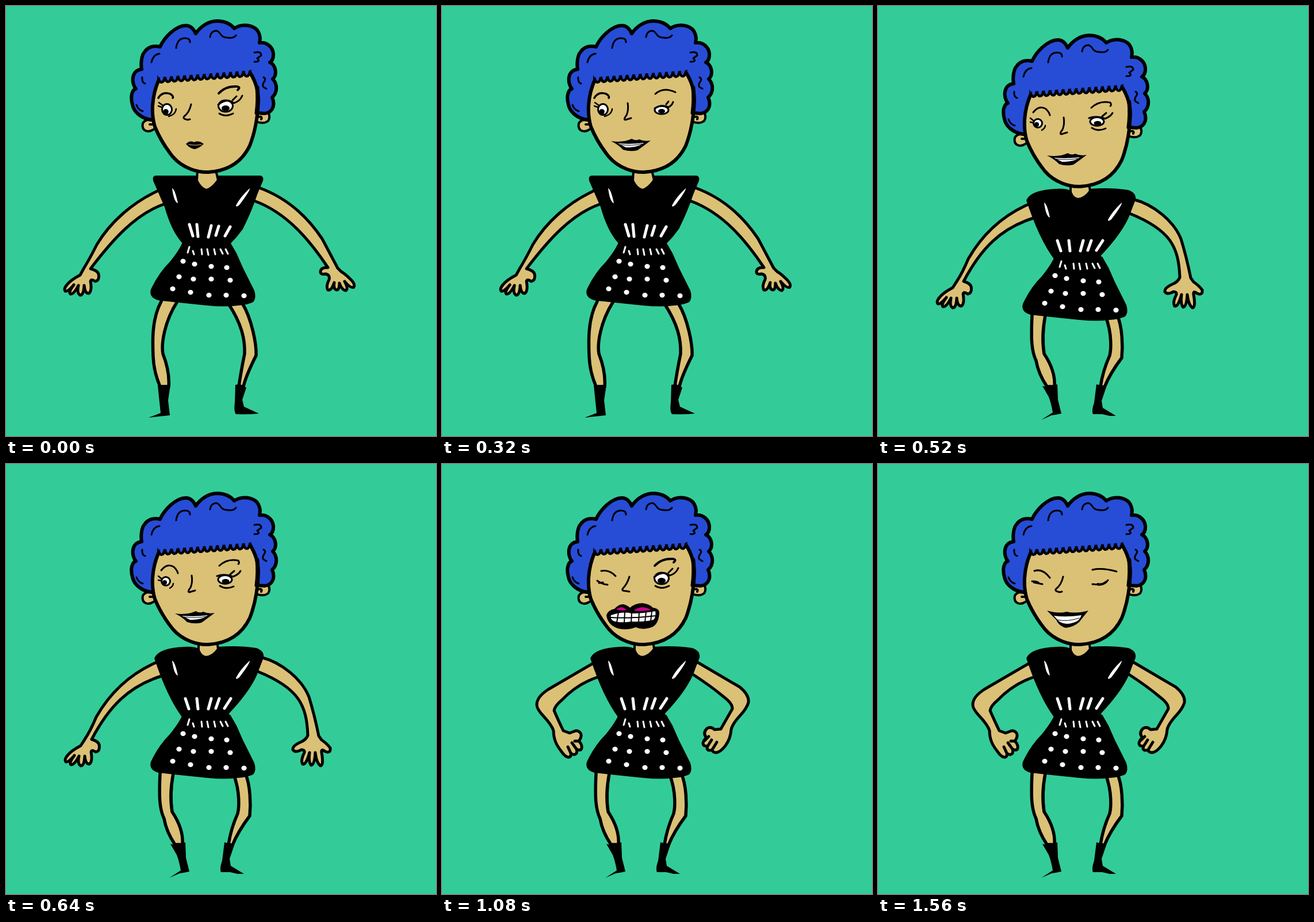
An HTML page that plays this animation: 748x748 px, repeating every 1.6 s.

```html
<!DOCTYPE html>
<html lang="en">
<head>
<meta charset="utf-8">
<title>Dancing woman</title>
<style>
html, body { margin: 0; height: 100%; overflow: hidden; background: #33cc99; }
svg { display: block; width: 100%; height: 100%; }
.limb, .line, .skin { stroke: #000; stroke-width: 6; stroke-linecap: round; stroke-linejoin: round; }
.limb, .skin { fill: #dbc176; }
.limb { stroke-width: 5.5; }
.arm { stroke-width: 5; }
.thin { stroke-width: 4; }
.line { fill: none; stroke-width: 3; }
.white { fill: #fff; }
.ring { fill: #fff; stroke: #000; stroke-width: 3; }
.hair { fill: #274dd7; }
.marks { fill: none; stroke: #fff; stroke-width: 5; stroke-linecap: round; }
</style>
</head>
<body>
<svg viewBox="0 0 748 748">
  <!-- Legs -->
  <g data-t="0-520">
    <path class="limb" d="M270 514C253 545 255 585 256 610Q257 636 268 662L283 662Q285 636 273 605C270 588 275 550 298 514"/>
    <path class="limb" d="M387 518C410 553 416 580 415 605Q408 640 405 662L413 662Q417 644 435 608C436 590 428 545 411 517"/>
    <path d="M264 660L286 659L282 686L285 712L248 716L269 708L266 680ZM399 659Q410 656 418 664L411 685L414 697L440 709Q420 711 400 710Q396 705 398 690Z"/>
  </g>
  <g data-t="520-1600">
    <path class="limb" d="M268 538C266 580 267 600 275 617Q279 640 294 662L307 662Q309 635 289 605C285 580 287 560 291 538"/>
    <path class="limb" d="M396 540C408 572 405 600 403 608Q391 635 387 662L394 663Q403 640 424 612C426 590 425 560 417 540"/>
    <path d="M286 661L296 663L312 658L313 685L319 709Q310 711 302 712L284 720L304 707Q301 690 297 680ZM380 658L397 663L389 687L391 699L414 713L403 713L390 710L374 710Q371 704 376 690Z"/>
  </g>

  <!-- Arms -->
  <g data-t="0-520">
    <path class="limb arm" d="M270 319C220 340 180 378 158 415Q146 439 135 457L129 468Q112 477 106 485Q100 492 103 496Q107 498 118 485Q108 498 112 501Q118 502 126 486Q123 500 129 503Q135 503 136 486Q137 500 144 500Q150 496 147 479Q148 474 155 479Q163 478 161 466Q159 460 147 457C185 407 225 362 274 345"/>
    <path class="limb arm" d="M432 339C490 360 530 410 560 455Q548 454 547 462Q547 468 556 466Q564 468 562 476Q556 488 560 494Q566 496 571 481Q569 492 575 494Q580 494 580 482Q584 494 591 495Q596 492 589 479Q600 492 605 489Q608 484 600 476Q590 466 583 462L577 456Q566 435 550 405C530 375 495 336 440 316"/>
  </g>
  <g data-t="520-680">
    <path class="limb arm" d="M264 344C215 365 180 400 157 440Q147 464 137 479L130 490Q113 499 107 507Q101 514 104 518Q108 520 119 507Q109 520 113 523Q119 524 127 508Q124 522 130 525Q136 525 137 508Q138 522 145 522Q151 518 148 501Q149 496 156 501Q164 500 162 488Q160 482 149 479C179 422 213 387 270 369"/>
    <path class="limb arm" d="M438 361C510 390 523 420 525 472Q522 480 512 484Q498 490 499 497Q503 503 514 497Q520 497 519 502Q512 516 516 522Q522 524 528 502Q526 520 531 524Q537 522 538 502Q540 520 547 525Q553 524 549 502Q548 494 555 500Q565 504 564 494Q558 486 549 480L544 473Q537 438 527 405C515 375 480 345 443 336"/>
  </g>
  <g data-t="680-1600">
    <path class="limb arm" d="M264 346L185 392Q165 405 165 418Q164 425 176 438Q191 454 194 464C194 480 200 490 207 499Q215 511 221 510Q225 509 224 503Q230 508 234 503Q235 500 234 496Q242 500 243 494Q244 488 238 482Q244 474 241 468Q236 462 230 465L222 468L211 464Q201 443 195 429Q196 421 208 411Q235 383 270 371M224 503L219 492M234 496L226 485M238 482L231 482"/>
    <path class="limb arm" d="M443 344L518 388Q535 402 533 415Q530 425 520 436Q505 452 503 462Q502 478 493 490Q484 502 476 502Q470 501 470 497Q463 500 461 495L462 491Q454 491 454 486Q455 480 460 476Q453 468 461 460Q468 456 474 462L485 461Q497 440 505 426Q506 417 490 405Q470 388 438 367M470 497L478 484M462 491L469 480M457 481L464 474"/>
  </g>

  <!-- Dress and neck -->
  <g data-t="0-520">
    <path d="M260 295L443 295Q449 297 447 304L437 328Q428 356 412 388Q402 402 390 414L308 414Q288 393 276 350L256 304Q254 296 260 295Z"/>
    <path class="marks" d="M319 380L325 400M332 380L334 401M357 382L352 402M370 383L365 399M390 384L381 400"/>
    <path class="skin thin" d="M333 286L332 304Q339 318 348 320Q358 319 369 303L365 286"/>
  </g>
  <g data-t="520-1600">
    <path d="M258 338Q265 320 310 318Q328 317 336 322L369 318Q405 315 435 320Q450 325 448 337L436 368Q423 397 388 434L389 440L306 440Q280 405 258 338Z"/>
    <path class="marks" d="M312 408L318 426M332 408L334 426M357 408L352 426M371 408L365 425M391 408L380 425"/>
    <path class="skin thin" d="M335 308L335 324Q339 335 348 336Q360 335 369 322L367 308"/>
  </g>
  <g class="lowered">
    <path d="M307 411L390 411L401 430L412 455L432 495Q436 508 430 515Q420 520 404 521Q380 524 350 521Q300 516 265 512Q248 507 252 493Q265 465 285 445Q302 424 307 411Z"/>
    <path class="marks" style="stroke-width:3" d="M319 419L316 429M325 426L327 432M340 423L341 432M350 423L352 433M362 423L364 432M373 423L377 431M382 423L386 431"/>
    <path class="white" d="M289 317Q294 319 299 343Q292 341 289 317ZM424 317Q425 321 406 346Q400 351 400 347Q407 333 424 317Z"/>
    <g id="dots" class="white"></g>
  </g>

  <!-- Head -->
  <g class="lowered">
    <path class="skin thin" d="M258 201Q244 194 238 204Q236 214 243 217Q250 220 259 213M250 206L257 206M437 187L455 184Q461 192 456 200Q448 206 435 201M436 194Q447 190 444 197"/>
    <path class="skin hair" d="M254 198C234 196 222 183 220 172C216 158 219 146 226 144C218 135 217 112 236 110C234 100 236 85 241 80C246 72 256 68 268 71C275 55 295 34 313 34C322 34 327 41 330 48C338 36 352 26 368 26Q388 27 397 39C412 29 430 34 437 42Q444 52 441 64C455 62 464 73 465 82Q466 94 459 98C470 103 472 120 464 127C472 135 473 150 463 159C468 170 466 185 450 187L437 186Z"/>
    <path class="skin" d="M266 128C252 160 253 190 259 210Q270 237 290 262C308 283 335 290 352 289C385 287 410 272 424 243C433 220 438 190 439 165Q439 138 424 115Z"/>
    <path class="line" style="stroke-width:7" d="M437 142Q439 165 436 186"/>
    <path id="fringe" class="skin hair" style="stroke-width:4.5"/>
    <path fill="#274dd7" d="M264 124L271 100L420 90L430 108L424 112Z"/>
    <path class="line" d="M253 98Q256 84 267 83M296 73Q298 57 310 56Q320 55 320 63M355 54Q356 44 365 43C374 43 371 55 385 55Q396 57 400 51M432 81Q444 78 444 86L437 91Q444 97 432 97M448 124Q453 126 449 132Q445 137 448 141L453 144M237 124Q236 133 242 135M227 172Q230 181 238 183"/>

    <!-- Left eye -->
    <g data-t="0-520">
      <path class="line" style="stroke-width:3.5" d="M265 160Q272 148 286 153Q292 157 290 160"/>
      <ellipse class="ring" cx="280" cy="180" rx="8.5" ry="9.5"/><circle cx="278" cy="184" r="4.8"/>
      <path class="line" style="stroke-width:2.5" d="M273 173L266 168M271 176L265 174M283 192Q295 189 296 179"/>
    </g>
    <g data-t="520-680">
      <path class="line" d="M270 160Q280 147 292 154Q298 160 299 165"/>
      <ellipse class="ring" cx="278" cy="179" rx="7.5" ry="7.5"/><circle cx="276" cy="181" r="4"/>
      <path class="line" style="stroke-width:2.5" d="M271 175L265 170M270 178L265 177M285 191Q291 187 291 183"/>
    </g>
    <path class="line" data-t="680-1320" d="M277 161Q291 158 302 170M270 178Q278 184 288 185M273 182L280 181"/>
    <path class="line" data-t="1320-1600" d="M272 161Q286 156 299 173M268 179Q277 179 280 182M271 181L286 184"/>

    <!-- Right eye -->
    <g data-t="0-80 680-1320">
      <path class="line" style="stroke-width:4" d="M370 152Q382 139 401 140Q409 141 403 146"/>
      <ellipse class="ring" cx="382" cy="174" rx="12.5" ry="10"/><ellipse cx="382" cy="178" rx="7" ry="5"/>
      <path class="line" d="M369 172Q384 159 396 169Q407 166 411 156M394 164L401 157M371 187Q382 194 395 187"/>
    </g>
    <g data-t="80-320">
      <path class="line" d="M373 157Q388 151 409 155M380 183Q392 182 402 178"/>
      <ellipse cx="386" cy="185" rx="7" ry="4"/><circle class="white" cx="384" cy="185" r="1.5"/>
    </g>
    <g data-t="320-520">
      <path class="line" d="M371 153Q385 140 406 150"/>
      <ellipse class="ring" cx="382" cy="181" rx="12" ry="7"/><ellipse cx="382" cy="183" rx="6" ry="4"/>
      <path class="line" d="M370 178Q383 170 394 176Q400 173 402 167M390 171L394 166"/>
    </g>
    <g data-t="520-680">
      <path class="line" d="M371 152Q385 139 404 143Q407 147 404 149"/>
      <ellipse class="ring" cx="381" cy="176" rx="12" ry="7.5"/><ellipse cx="382" cy="179" rx="6.5" ry="4"/>
      <path class="line" d="M367 170Q380 165 395 171Q405 167 408 161M390 167L397 161M372 187Q383 194 396 188"/>
    </g>
    <g data-t="1320-1600">
      <path class="line" d="M373 159Q390 155 415 162M373 184L385 185Q396 183 400 177"/>
      <path class="line" style="stroke-width:4" d="M382 184Q390 186 397 180"/>
    </g>

    <!-- Nose -->
    <path class="line" data-t="0-320 1320-1600" d="M322 171Q319 185 310 192Q306 196 316 198L320 197"/>
    <path class="line" data-t="320-680" d="M323 169Q325 180 321 190Q315 197 319 198L329 195"/>
    <path class="line" data-t="680-1320" d="M326 171Q322 184 315 191Q311 196 320 196L326 197"/>

    <!-- Mouth -->
    <g data-t="0-320">
      <path d="M313 240Q320 233 327 237Q335 233 344 240Q335 248 328 249Q320 248 313 240Z"/>
      <path class="line" style="stroke:#dbc176;stroke-width:1.2" d="M318 241Q328 243 340 241"/>
    </g>
    <g data-t="320-680">
      <path d="M294 235Q315 238 330 231Q337 235 343 232Q352 236 363 234Q350 244 340 251Q328 254 315 250Q308 242 294 235Z"/>
      <path class="white" d="M306 239Q330 241 351 238Q342 246 320 246Z"/>
      <path class="line" style="stroke-width:1" d="M309 241Q330 244 348 240"/>
    </g>
    <g data-t="680-1320">
      <path d="M286 238Q289 229 300 227Q308 218 316 219Q323 221 327 225Q336 217 349 217Q362 219 367 225Q378 226 378 234Q377 252 367 258Q350 265 337 259Q322 265 306 261Q288 255 286 238Z"/>
      <path fill="#cc0088" d="M303 228Q313 220 321 229Q312 231 303 228ZM333 230Q348 219 364 229Q348 232 333 230Z"/>
      <path class="white" d="M294 238Q315 231 330 235Q350 235 371 231Q373 240 368 246Q350 250 330 249Q310 252 298 248Q292 244 294 238Z"/>
      <path class="line" style="stroke-width:2" d="M294 242Q330 244 372 239M307 232L304 251M318 232L317 251M330 233L329 251M343 233L342 251M355 232L353 250M365 231L363 249"/>
    </g>
    <g data-t="1320-1600">
      <path d="M294 230Q315 236 328 232Q345 236 366 230Q356 242 350 250Q340 259 326 260Q314 256 310 246Z"/>
      <path class="white" d="M306 239Q328 242 354 238Q350 249 340 251Q325 256 314 248Z"/>
      <path class="line" style="stroke-width:1" d="M311 246Q330 250 350 243"/>
    </g>
  </g>
</svg>
<script>
const LOOP = 1600, STEP = 40, CROUCH = 520;

const dots = [[308,444],[328,449],[357,453],[384,455],[301,471],[326,475],[357,475],[390,477],
  [290,492],[321,498],[353,503],[383,503],[414,504]];
document.getElementById('dots').innerHTML = dots
  .map(([x, y]) => `<ellipse cx="${x}" cy="${y}" rx="4.6" ry="4.2"/>`).join('');

let fringe = 'M265 123';
for (let i = 0; i < 14; i++) fringe += 'c1 13 10 13 11.4 -.8';
document.getElementById('fringe').setAttribute('d', fringe);

const parts = [...document.querySelectorAll('[data-t]')].map(el => ({
  el, spans: el.dataset.t.split(' ').map(span => span.split('-').map(Number))
}));
const lowered = document.querySelectorAll('.lowered');

function draw(now) {
  const t = Math.floor(now % LOOP / STEP) * STEP;
  for (const { el, spans } of parts) {
    el.style.display = spans.some(([from, to]) => t >= from && t < to) ? '' : 'none';
  }
  const y = t < CROUCH ? 0 : 25;
  lowered.forEach(el => el.setAttribute('transform', `translate(0 ${y})`));
  requestAnimationFrame(draw);
}
draw(performance.now());
</script>
</body>
</html>
```
